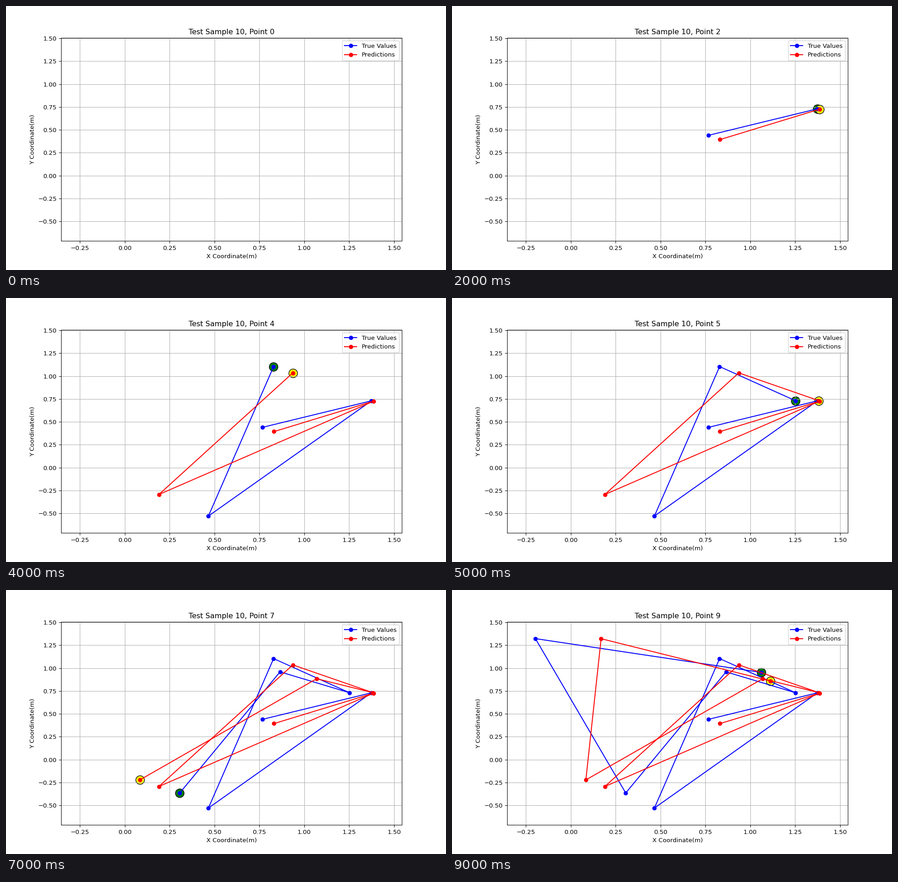
Animation of 966 by 580 pixels, one loop 10000 ms. Source, as a matplotlib script:

```python
import numpy as np
import matplotlib.pyplot as plt
from matplotlib.animation import FuncAnimation

WIDTH, HEIGHT = 966, 580
DPI = WIDTH / 10
MARGIN = 0.1

# Measured key points (x, y) in metres, in the order they are visited.
TRUE = np.array([
    (0.768, 0.441), (1.374, 0.730), (0.466, -0.528),
    (0.829, 1.104), (1.252, 0.731), (0.865, 0.959),
    (0.306, -0.364), (-0.197, 1.322), (1.062, 0.953),
])
PRED = np.array([
    (0.831, 0.394), (1.386, 0.726), (0.190, -0.293),
    (0.936, 1.035), (1.382, 0.732), (1.069, 0.884),
    (0.084, -0.221), (0.169, 1.321), (1.113, 0.859),
])


def padded(values):
    pad = MARGIN * np.ptp(values)
    return values.min() - pad, values.max() + pad


plt.rcParams["font.family"] = "DejaVu Sans"
# The small addition keeps float rounding from dropping a pixel.
fig, ax = plt.subplots(figsize=((WIDTH + 0.01) / DPI, (HEIGHT + 0.01) / DPI),
                       dpi=DPI)
both = np.vstack([TRUE, PRED])
ax.set_xlim(padded(both[:, 0]))
ax.set_ylim(padded(both[:, 1]))
ax.set_xlabel("X Coordinate(m)")
ax.set_ylabel("Y Coordinate(m)")
ax.grid(True)
title = ax.set_title("")


def make_track(color, glow, label):
    line, = ax.plot([], [], color=color, marker="o", label=label)
    spot = ax.scatter([], [], s=200, c=glow, edgecolors="black", linewidths=1)
    return line, spot


tracks = [
    (TRUE, *make_track("blue", "green", "True Values")),
    (PRED, *make_track("red", "yellow", "Predictions")),
]
ax.legend(loc="upper right")


def update(step):
    """Show the first `step` points and highlight the newest one."""
    for points, line, spot in tracks:
        line.set_data(points[:step, 0], points[:step, 1])
        spot.set_offsets(points[max(step - 1, 0):step])
    title.set_text(f"Test Sample 10, Point {step}")
    return [title] + [artist for _, *pair in tracks for artist in pair]


anim = FuncAnimation(fig, update, frames=len(TRUE) + 1, interval=1000,
                     repeat=True)
plt.show()
```
